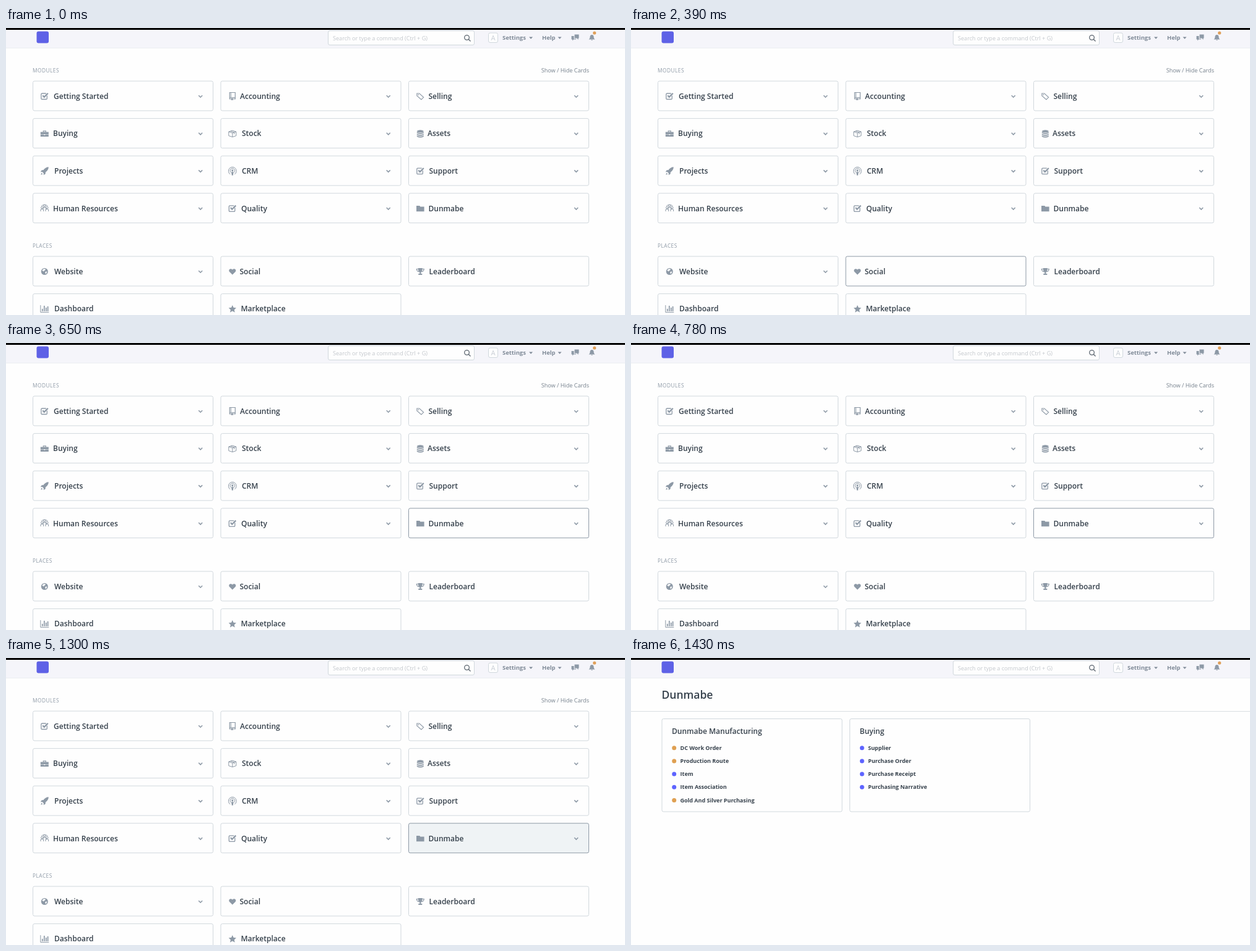
Write an HTML page that moves like this. It is 1000x465 px and loops after 4420 ms.

```html
<!DOCTYPE html>
<html lang="en">
<head>
<meta charset="utf-8">
<title>Desk</title>
<style>
  html, body { margin: 0; height: 100%; overflow: hidden; background: #fefefe; }
  svg { display: block; width: 1000px; height: 465px; font-family: "Open Sans", "Noto Sans", sans-serif; }
  .card { fill: #fefefe; stroke: #d1d8dd; }
  .card.hover { stroke: #8d99a6; }
  .card.pressed { fill: #eff3f5; }
  .name { font-size: 12px; font-weight: 600; fill: #36414c; }
  .title { font-size: 17.5px; font-weight: 600; fill: #36414c; }
  .item { font-size: 9px; font-weight: 700; fill: #36414c; }
  .section { font-size: 8.3px; letter-spacing: .5px; fill: #8d99a6; }
  .small { font-size: 9.1px; fill: #76818d; }
  .hint { font-size: 9.1px; fill: #c3c7cc; }
  .menu { font-size: 9.4px; font-weight: 700; fill: #7f8a97; }
  .avatar { font-size: 11px; fill: #c9ced6; }
  .fill { fill: #8d99a6; }
  .line { fill: none; stroke: #8d99a6; }
</style>
</head>
<body>
<svg id="stage" viewBox="0 0 1000 465"></svg>
<script>
const LOOP = 4420;
const COMPANY = 'Dunmabe';
const COLUMNS = [43.5, 347, 650.5];

const text = (cls, x, y, s, more = '') => `<text class="${cls}" x="${x}" y="${y}" ${more}>${s}</text>`;
const line = (d, width = 1) => `<path class="line" d="${d}" stroke-width="${width}"/>`;
const fill = (d, color = '') => `<path class="fill" d="${d}" ${color && `style="fill:${color}"`}/>`;
const dot = (x, y, r, color) => `<circle cx="${x}" cy="${y}" r="${r}" fill="${color}"/>`;
const ring = (r, width = 1) => `<circle class="line" r="${r}" stroke-width="${width}"/>`;
const at = (x, y, s) => `<g transform="translate(${x} ${y})">${s}</g>`;
const box = (x, y, w, h, id = '') => `<rect class="card" data-id="${id}" x="${x}" y="${y}" width="${w}" height="${h}" rx="2.5"/>`;
const band = y => `M-5.5 ${y}Q0 ${y + 3} 5.5 ${y}v1.8q-5.5 3-11 0Z`;
const person = (x, y) => at(x, y, ring(1.7) + line('M-2.3 6V3Q0 1.2 2.3 3V6'));

// Icons are drawn around their own centre
const icons = {
  check: line('M4-1V3.5Q4 5 2.5 5H-4Q-5.5 5-5.5 3.5V-3Q-5.5-4.5-4-4.5H2.5', 1.3) + line('M-3-1.2L-.6 1.4 5.5-4.7', 2.2),
  book: line('M-2 4.5H-4.5V-6H4.5V4.5H1.5M-4.5 2.3H4.5', 1.2) + line('M-2.5-6V2') + fill('M-2 3.5H1V7L-.5 5.8-2 7Z'),
  tag: line('M-5.5-4.5H-1.5L5.3 1.8 1.6 5.5-5.5-.8Z', 1.1) + dot(-3.2, -2.4, .9, '#8d99a6'),
  briefcase: fill('M-6.5-2.5H6.5V.8H-6.5ZM-6.5 1.5H-1V2.5H1V1.5H6.5V5H-6.5Z') + line('M-2-2.5V-4.3H2V-2.5', 1.3),
  box: line('M-6-3L0-5 6-3V3.5L0 5.5-6 3.5ZM-6-3L0-1 6-3M0-1V5.5M-3-4L3-2V1'),
  database: fill('M-5.5-3.8A5.5 2 0 0 1 5.5-3.8A5.5 2 0 0 1-5.5-3.8Z' + band(-2.6) + band(.3) + band(3.2)),
  rocket: fill('M6.5-6.5C3-6.5 0-4.5-2-1.5H-4.5L-6.5 1.5H-3.5L-1.5 3.5V6.5L1.5 4.5V2C4.5 0 6.5-3 6.5-6.5ZM-6 6L-5 3-3 5Z'),
  broadcast: line('M-3.6 5.3A6.4 6.4 0 1 1 3.6 5.3M-2.2 2.6A3.8 3.8 0 1 1 2.2 2.6') + dot(0, -.8, 1.6, '#8d99a6') + fill('M-1.8 1.5H1.8L1 7H-1Z'),
  people: person(0, -4.2) + person(-4, -1.2) + person(4, -1.2) + line('M-5-4Q0-8 5-4'),
  folder: fill('M-6.3-4.3H-1L0-2.8H6.3V5H-6.3Z'),
  globe: dot(0, 0, 5.5, '#8d99a6') + fill('M-1-4.5L2-3.5 0-1.5-2 0-4-2ZM1 .5L4 0 3 3 1.5 4Z', '#fefefe'),
  heart: fill('M0 5.3L-4.8 .5C-7-2-4-6.3 0-3C4-6.3 7-2 4.8 .5Z'),
  trophy: fill('M-3.5-5.5H3.5C3.5-1 2.5 .5 1 1.5V3.5H3V5.5H-3V3.5H-1V1.5C-2.5 .5-3.5-1-3.5-5.5Z') + line('M-3.5-4H-6Q-5.5 0-2 .3M3.5-4H6Q5.5 0 2 .3', 1.2),
  chart: line('M-6.5-6V5.5H7') + line('M-3.5 4V0M-.5 4V-5M2.5 4V-2M5.3 4V-4', 1.7),
  star: fill('M0-6L1.8-2 6.2-1.6 2.9 1.4 3.9 5.6 0 3.4-3.9 5.6-2.9 1.4-6.2-1.6-1.8-2Z'),
};

// label, icon, label offset, opens a list
const modules = [
  ['Getting Started', 'check', 33.5, 1], ['Accounting', 'book', 31, 1], ['Selling', 'tag', 32, 1],
  ['Buying', 'briefcase', 32.5, 1], ['Stock', 'box', 34, 1], ['Assets', 'database', 30.5, 1],
  ['Projects', 'rocket', 34.5, 1], ['CRM', 'broadcast', 34, 1], ['Support', 'check', 33, 1],
  ['Human Resources', 'people', 32.5, 1], ['Quality', 'check', 33, 1], [COMPANY, 'folder', 32, 1],
];
const places = [
  ['Website', 'globe', 34.5, 1], ['Social', 'heart', 30.5, 0], ['Leaderboard', 'trophy', 33, 0],
  ['Dashboard', 'chart', 34.5, 0], ['Marketplace', 'star', 32.5, 0],
];

const cardGrid = (cards, top) => cards.map(([label, icon, offset, opens], i) => {
  const x = COLUMNS[i % 3], y = top + Math.floor(i / 3) * 60.6;
  return box(x, y, 291, 48, label) + at(x + 18.8, y + 24.5, icons[icon]) +
    text('name', x + offset, y + 28.7, label) +
    (opens ? at(x + 270.7, y + 24.7, line('M-3-1.5L0 1.5 3-1.5', 1.6)) : '');
}).join('');

const linkList = (x, heading, items) => box(x, 98.5, 291, 150.5) +
  text('name', x + 16, 123, heading) +
  items.map(([label, color], i) => {
    const y = 145.7 + i * 21.2;
    return dot(x + 19.7, y, 3.5, color) + text('item', x + 29.5, y + 3.1, label);
  }).join('');

const caret = (x, y) => at(x, y, fill('M-3-1.5H3L0 1.7Z', '#7f8a97'));
const header = `<rect width="1000" height="32" fill="#f5f5fa"/><rect width="1000" height="3"/>
  <path d="M0 32.5H1000" stroke="#eceef2"/>
  <rect x="49.5" y="5.5" width="19.5" height="19" rx="3" fill="#5e61e6"/>` +
  box(520.5, 4.5, 236, 23) + text('hint', 528, 19.5, 'Search or type a command (Ctrl + G)') +
  at(744.5, 15.5, '<g style="--c:0" stroke="#5c6670" fill="none" stroke-width="1.3"><circle r="3.8"/><path d="M2.7 2.7L6 6"/></g>') +
  box(779.5, 8, 15, 15.5) + text('avatar', 787, 19.8, 'A', 'text-anchor="middle"') +
  text('menu', 802, 19, 'Settings') + caret(848, 16) + text('menu', 866, 19, 'Help') + caret(894.5, 16) +
  at(919.5, 15, fill('M-1-4.5H6V1.5H5V4L2.8 1.5H-1Z') + fill('M-6-2H-2V2.5H1.5V3.5H-2.5L-4.5 5.5V3.5H-6Z')) +
  at(946.5, 15.5, fill('M-5 3Q-3 1.5-3-1Q-3-4.5 0-4.5Q3-4.5 3-1Q3 1.5 5 3ZM-1.5 3.6H1.5Q0 5.5-1.5 3.6Z')) +
  dot(950.7, 8, 2.6, '#e0a05a');

const orange = '#dfa052', purple = '#5e64ff';
const home = text('section', 43, 72.3, 'MODULES') +
  text('small', 942, 72.3, 'Show / Hide Cards', 'text-anchor="end"') + cardGrid(modules, 86) +
  text('section', 43, 356.3, 'PLACES') + cardGrid(places, 370);
const detail = text('title', 49.5, 66, COMPANY) + '<path d="M0 86.5H1000" stroke="#d9dee2"/>' +
  linkList(50, COMPANY + ' Manufacturing', [['DC Work Order', orange], ['Production Route', orange],
    ['Item', purple], ['Item Association', purple], ['Gold And Silver Purchasing', orange]]) +
  linkList(353.5, 'Buying', ['Supplier', 'Purchase Order', 'Purchase Receipt', 'Purchasing Narrative'].map(s => [s, purple]));

const stage = document.getElementById('stage');
stage.innerHTML = `${header}<g id="home">${home}</g><g id="detail">${detail}</g>`;
const homeView = document.getElementById('home'), detailView = document.getElementById('detail');
const cardOf = id => homeView.querySelector(`[data-id="${id}"]`);
const social = cardOf('Social'), company = cardOf(COMPANY);

function draw() {
  const t = performance.now() % LOOP;
  const opened = t >= 1430;
  homeView.style.display = opened ? 'none' : '';
  detailView.style.display = opened ? '' : 'none';
  social.classList.toggle('hover', t >= 390 && t < 520);
  company.classList.toggle('hover', t >= 650);
  company.classList.toggle('pressed', t >= 1300);
  requestAnimationFrame(draw);
}
draw();
</script>
</body>
</html>
```
